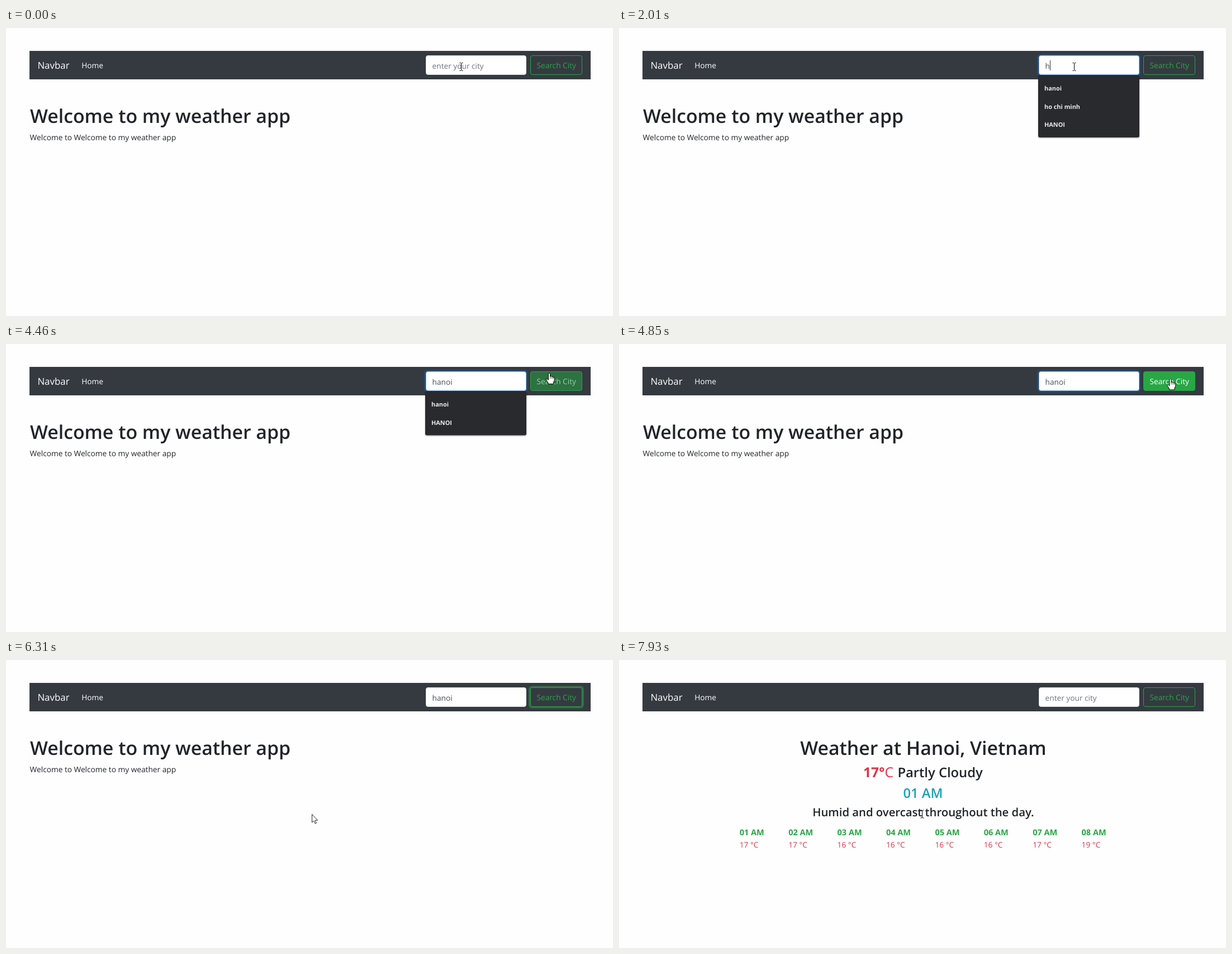
An HTML page that plays this animation: 1086x516 px, repeating every 8000 ms.

```html
<!DOCTYPE html>
<html lang="en">
<head>
<meta charset="utf-8">
<title>Weather search</title>
<style>
  html, body { margin: 0; width: 100%; height: 100%; overflow: hidden; background: #fefefe; }
  svg { display: block; width: 1086px; height: 516px; }
  text { font: 400 13.7px "Open Sans", "Noto Sans", sans-serif; fill: #212529; white-space: pre; text-rendering: geometricPrecision; }
  .mid { text-anchor: middle; }
  .semi { font-weight: 600; }
  .h1 { font-size: 33.8px; }
  .h3 { font-size: 23.75px; }
  .h4 { font-size: 20.3px; }
  .brand { font-size: 16.9px; }
  .brand, .link { fill: #fff; }
  .red { fill: #dc3545; }
  .teal { fill: #17a2b8; }
  .hour { font-size: 14.5px; font-weight: 700; fill: #28a745; }
  .degrees { font-size: 24.6px; font-weight: 700; }
  .thin { font-weight: 400; }
  #list rect { fill: #292a2d; filter: drop-shadow(0 1px 1px rgba(0, 0, 0, .4)); }
  #list text { font-size: 10.9px; font-weight: 700; fill: #e8eaed; }
</style>
</head>
<body>
<svg viewBox="0 0 1086 516">
  <rect x="42" y="41" width="1004" height="51" fill="#343a40"/>
  <text class="brand" x="56.4" y="73.3">Navbar</text>
  <text class="link" x="135.2" y="72">Home</text>

  <rect id="inputRing" x="748" y="46.5" width="185.5" height="40" rx="6" fill="#007bff"/>
  <rect id="input" x="751.5" y="49.5" width="179" height="34" rx="3.4" fill="#fff"/>
  <text id="entry" x="762.6" y="73"></text>
  <rect id="caret" y="58" width="1" height="18" fill="#333"/>

  <rect id="buttonRing" x="935" y="46.5" width="99" height="40" rx="6" fill="#28a745"/>
  <rect x="938" y="49" width="93" height="35" rx="3.8" fill="#343a40"/>
  <rect id="button" x="938.5" y="49.5" width="92" height="34" rx="3.4" stroke="#28a745"/>
  <text id="label" x="949.5" y="72">Search City</text>

  <g id="welcome">
    <text class="h1 semi" x="43" y="170.3">Welcome to my weather app</text>
    <text x="42.6" y="201">Welcome to Welcome to my weather app</text>
  </g>

  <g id="weather">
    <text class="h1 semi mid" x="544.4" y="170.3">Weather at Hanoi, Vietnam</text>
    <text class="degrees red" x="437" y="210">17°<tspan class="thin">C</tspan></text>
    <text class="h3 semi" x="498.4" y="210">Partly Cloudy</text>
    <text class="h3 semi teal mid" x="544" y="247">01 AM</text>
    <text class="h4 semi mid" x="544.4" y="280">Humid and overcast throughout the day.</text>
    <g id="hours"></g>
  </g>

  <g id="list">
    <rect x="750" y="84.5" width="181" rx="3"/>
    <text x="761" y="112"></text>
    <text x="761" y="144.5"></text>
    <text x="761" y="177"></text>
  </g>

  <path id="ibeam" fill="none" stroke="#000" d="M-3-6.5H-1L0-5.5 1-6.5H3M0-6V6.5M-3 7.5H-1L0 6.5 1 7.5H3"/>
  <path id="arrow" fill="#fff" stroke="#111" stroke-width=".9" d="M.5.5V15L3.8 12 6.2 17.2 8.4 16.2 6.1 11.2H10.5Z"/>
  <g id="hand" stroke="#000" stroke-linejoin="round">
    <path fill="#fff" d="M-1.6 1Q0-1 1.6 1V6Q3.4 5 4.6 6.6 6.2 6 7.1 7.5 9.2 7.2 9.3 9.2V13L7.5 16.5V19.5H-2V17.5L-5.6 12Q-6.4 9.5-4 10.4L-1.6 12.6Z"/>
    <path fill="none" stroke-width=".8" d="M1.6 6V10M4.6 7V10M7.1 8V10.5"/>
  </g>
</svg>
<script>
const LOOP = 8000;
const $ = id => document.getElementById(id);
const show = (el, on) => el.setAttribute("display", on ? "inline" : "none");

// Each track lists [start ms, value]; a value holds until the next start.
const tracks = {
  typed: [[0, ""], [2010, "h"], [2160, "ha"], [3240, "han"], [3360, "hano"], [3480, "hanoi"], [6990, ""]],
  caret: [[0, 0], [250, 1], [800, 0], [1230, 1], [1760, 0], [2010, 1], [2720, 0], [3120, 1], [4070, 0]],
  inputFocus: [[0, 0], [250, .5], [370, 1], [5010, 0]],
  buttonFocus: [[0, 0], [5010, 1], [6990, 0]],
  hover: [[0, 0], [4460, .5], [4580, 1], [5270, .4], [5390, 0]],
  rows: [[0, 0], [370, 3], [2160, 2], [4850, 0]],
  loaded: [[0, 0], [6990, 1]],
  pointer: [
    [0, ["ibeam", 814.5, 69]], [4220, ["ibeam", 850.5, 67]], [4340, ["ibeam", 915.5, 64]],
    [4460, ["hand", 972, 52]], [4730, ["hand", 986.5, 62.5]],
    [5270, ["arrow", 760, 170]], [5390, ["arrow", 540, 268]],
    [5790, ["arrow", 543, 272]], [5910, ["arrow", 545, 275]], [6310, ["arrow", 547, 276]],
    [7260, ["arrow", 546, 273]], [7380, ["ibeam", 550.5, 273]],
    [7780, ["ibeam", 550.5, 272]], [7930, ["ibeam", 542.5, 275.5]]
  ]
};
const at = (track, t) => track.findLast(([start]) => start <= t)[1];

const mix = (a, b, k) => "rgb(" + a.map((v, i) => Math.round(v + (b[i] - v) * k)) + ")";
const GREEN = [40, 167, 69], WHITE = [255, 255, 255], GREY = [222, 226, 230], BLUE = [128, 189, 255];

const temps = [17, 17, 16, 16, 16, 16, 17, 19];
$("hours").innerHTML = temps.map((deg, i) => {
  const x = 215.8 + i * 87.4;
  return `<text class="hour" x="${x}" y="314">0${i + 1} AM</text><text class="red" x="${x}" y="335.5">${deg} °C</text>`;
}).join("");

function drawInput(s) {
  $("input").setAttribute("stroke", mix(GREY, BLUE, s.inputFocus));
  $("inputRing").setAttribute("opacity", s.inputFocus * .25);
  const entry = $("entry");
  entry.textContent = s.typed || "enter your city";
  entry.style.fill = s.typed ? "#495057" : "#6c757d";
  const end = s.typed ? entry.getComputedTextLength() : 0;
  $("caret").setAttribute("x", Math.round(763 + end));
  show($("caret"), s.caret);
}

function drawButton(s) {
  $("buttonRing").setAttribute("opacity", s.buttonFocus * .5);
  $("button").setAttribute("fill", `rgba(${GREEN},${s.hover})`);
  $("label").style.fill = mix(GREEN, WHITE, s.hover);
}

function drawList(rows) {
  show($("list"), rows);
  const [box, ...lines] = $("list").children;
  box.setAttribute("height", 14 + 32.5 * rows);
  const names = rows === 3 ? ["hanoi", "ho chi minh", "HANOI"] : ["hanoi", "HANOI"];
  lines.forEach((line, i) => line.textContent = names[i] || "");
}

function drawPointer([kind, x, y]) {
  for (const id of ["ibeam", "arrow", "hand"]) show($(id), id === kind);
  $(kind).setAttribute("transform", `translate(${x} ${y})`);
}

function render(t) {
  const s = {};
  for (const name in tracks) s[name] = at(tracks[name], t);
  show($("welcome"), !s.loaded);
  show($("weather"), s.loaded);
  drawInput(s);
  drawButton(s);
  drawList(s.rows);
  drawPointer(s.pointer);
}

const began = performance.now();
function tick() {
  render((performance.now() - began) % LOOP);
  requestAnimationFrame(tick);
}
tick();
</script>
</body>
</html>
```
